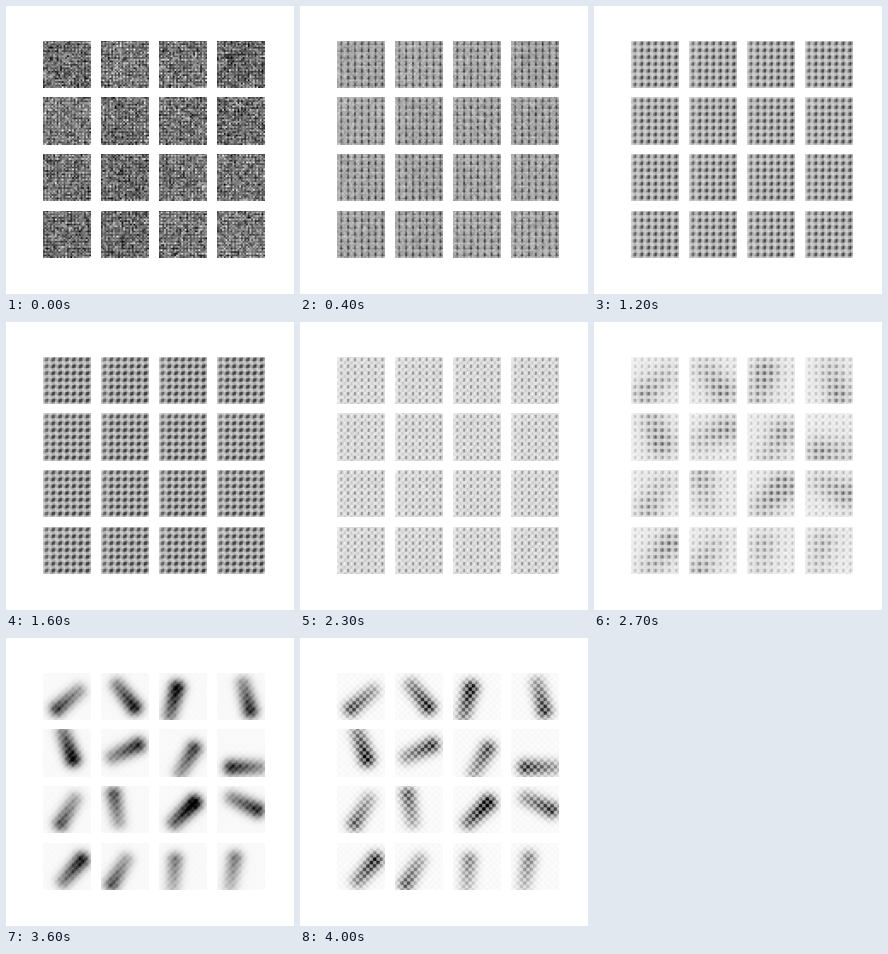
A matplotlib script that plays this animation: 288 px wide and 288 px high, repeating every 4.1 s.

```python
import numpy as np
import matplotlib.pyplot as plt
from matplotlib.animation import FuncAnimation

FRAMES, INTERVAL, N, PITCH = 41, 100, 28, 4
rng = np.random.default_rng(7)
yy, xx = np.mgrid[0:N, 0:N]

# Each tile's brush mark: heavy end (x, y), ink, direction of its tail in degrees
marks = [
    (8, 21, .9, -40), (19, 20, 1.1, -128), (10, 9, 1.2, 105), (19, 22, 1, -105),
    (17, 17, 1.2, -110), (21, 9, 1, 155), (20, 11, .9, 120), (8, 22, 1, 0),
    (10, 22, .8, -60), (7, 5, .8, 80), (20, 10, 1.4, 135), (23, 14, 1, 205),
    (22, 10, 1.1, 130), (6, 24, .8, -60), (9, 10, .6, 95), (10, 9, .6, 100),
]


def brush(x, y, ink, angle, spread, length=16):
    """Soft stroke that fades from its heavy end along the tail."""
    out = np.zeros((N, N))
    a = np.radians(angle)
    for s in np.linspace(0, 1, 12):
        dx = xx - x - s * length * np.cos(a)
        dy = yy - y - s * length * np.sin(a)
        dab = ink * (1 - .5 * s) * np.exp(-(dx ** 2 + dy ** 2) / (2 * spread ** 2))
        out = np.maximum(out, dab)
    return out


def offsets(cx, cy):
    """Distance of every pixel from the nearest lattice point."""
    half = PITCH / 2
    return (xx - cx + half) % PITCH - half, (yy - cy + half) % PITCH - half


def spots(cx, cy, sx, sy, tilt=0):
    dx, dy = offsets(cx, cy)
    return np.exp(-dx ** 2 / (2 * sx ** 2) - dy ** 2 / (2 * sy ** 2) - tilt * dx * dy)


def crosses(cx, cy):
    dx, dy = offsets(cx, cy)
    return np.exp(-2 * (np.abs(dx) - np.abs(dy)) ** 2)


edge_fade = 1 - .5 * np.exp(-xx / 2) - .3 * np.exp(-yy / 1.5)
bars = .16 + .72 * spots(2, 1.5, .6, .9) * edge_fade
blocks = .14 + .8 * spots(1.5, 1.5, .95, .9, .35) * edge_fade
dots = .06 + (.5 * spots(2, 1.5, .6, .7, .3) + .2 * spots(0, 3.5, .7, .7)) * edge_fade
dashes = .15 + spots(1.5, 1.5, 1, .6) + .25 * spots(1.5, 1.5, .5, 2)
slants = .6 + .45 * spots(1, 1, .8, .9, .3) + .35 * spots(3, 3, .8, .9, .3)
weave = .35 + .65 * crosses(1.5, 1.5)


def noise(level):
    bright = (xx % 2) * (yy % 2)
    return rng.normal(level, .15, (N, N)) - .25 * bright


def tile_stages(mark):
    grain = rng.normal(0, .02, (N, N))
    wide, narrow = brush(*mark, 5.5), brush(*mark, 3.3)
    return np.clip([
        noise(rng.uniform(.56, .66)),
        bars + grain,
        blocks + grain,
        dots + grain,
        dashes * (.04 + .85 * np.minimum(wide, 1)),
        slants * (.03 + narrow),
        weave * (.03 + .9 * narrow),
    ], 0, 1)


key_frames = np.array([0, 8, 16, 23, 31, 36, 40])
stages = [tile_stages(mark) for mark in marks]

fig, axes = plt.subplots(4, 4, figsize=(4, 4), dpi=72, facecolor="white")
fig.subplots_adjust(left=.125, right=.9, bottom=.125, top=.88, wspace=.2, hspace=.2)
images = []
for ax, stage in zip(axes.flat, stages):
    ax.axis("off")
    images.append(ax.imshow(1 - stage[0], cmap="gray", vmin=0, vmax=1))


def draw(frame):
    k = min(np.searchsorted(key_frames, frame, side="right") - 1, len(key_frames) - 2)
    t = (frame - key_frames[k]) / (key_frames[k + 1] - key_frames[k])
    if k == 0:
        t = t ** .6  # the noise settles early
    for image, stage in zip(images, stages):
        image.set_data(1 - ((1 - t) * stage[k] + t * stage[k + 1]))
    return images


anim = FuncAnimation(fig, draw, frames=FRAMES, interval=INTERVAL,
                     repeat=True, repeat_delay=0, blit=False)
plt.show()
```
